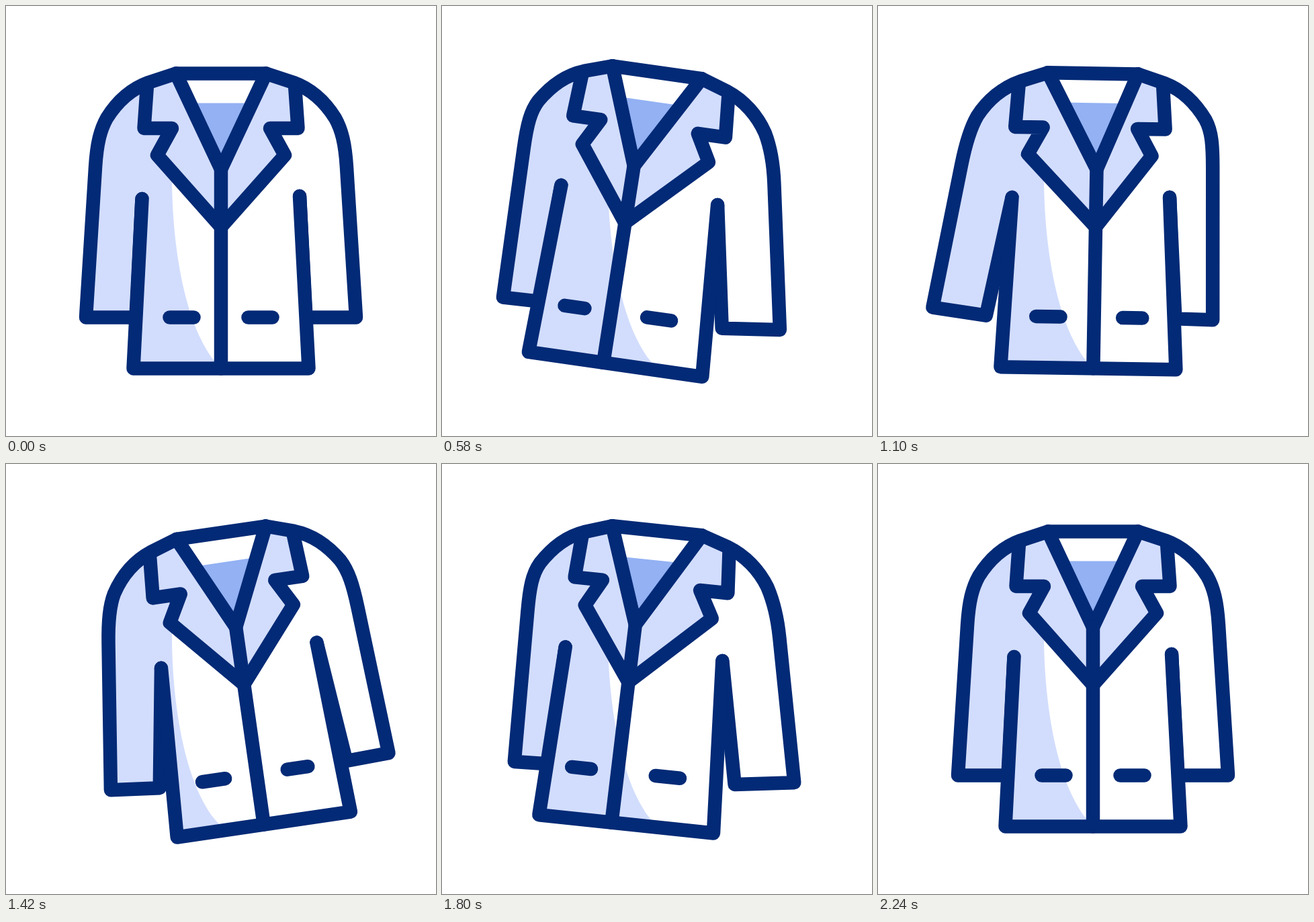
An HTML page with a canvas for the animation above (2420 ms loop, 640x640 px).

```html
<!DOCTYPE html>
<html lang="en">
<head>
<meta charset="utf-8">
<title>Swinging jacket</title>
<style>
  html, body { margin: 0; width: 100%; height: 100%; overflow: hidden; background: #fff; }
  canvas { display: block; width: 640px; height: 640px; }
</style>
</head>
<body>
<canvas id="stage" width="640" height="640"></canvas>
<script>
const ctx = document.getElementById('stage').getContext('2d');
const NAVY = '#032a76', PALE = '#d2ddfd', BLUE = '#93b1f3';
const LOOP = 2420, STEP = 20;
const PIVOT = [332, 100];

// [time, value] keys, eased in and out between neighbours
const TILT = [[200, 0], [813, 12], [1365, -8.9], [1840, 6.3], [2240, 0]];
const LEFT = [[200, 0], [720, 1], [1180, 0], [1820, 1], [2100, 0]];
const RIGHT = [[720, 0], [1180, 1], [1820, 0]];

function valueAt(keys, t) {
  if (t <= keys[0][0]) return keys[0][1];
  for (let i = 1; i < keys.length; i++) {
    const [t0, a] = keys[i - 1], [t1, b] = keys[i];
    if (t < t1) {
      const p = (t - t0) / (t1 - t0);
      return a + (b - a) * p * p * (3 - 2 * p);
    }
  }
  return keys[keys.length - 1][1];
}

function line(points, closed) {
  const path = new Path2D();
  points.forEach(([x, y]) => path.lineTo(x, y));
  if (closed) path.closePath();
  return path;
}

// Shoulder curve, cuff and inner seam; side is 1 for left, -1 for right
function sleeve(side, bend, cuff, inner, arm) {
  const x = v => side > 0 ? v : 640 - v;
  const elbow = x(133) + bend, lift = bend * .2;
  const path = new Path2D();
  path.moveTo(x(253), 100.5);
  path.lineTo(x(212), 114);
  path.bezierCurveTo(x(186), 123.5, x(165) + lift, 143, x(150) + lift, 167);
  // The curve runs straight on into the lower sleeve
  path.bezierCurveTo(x(140.5) + lift, 184,
    elbow + (elbow - cuff[0]) * .16, 240 + (240 - cuff[1]) * .16, elbow, 240);
  path.lineTo(...cuff);
  path.lineTo(...inner);
  path.lineTo(...arm);
  return path;
}

// Light boundary stays still while the jacket swings
const shade = new Path2D('M0 0H247V255C247 350 264 470 310 528L340 562V640H0Z');

function draw(t) {
  const l = valueAt(LEFT, t), r = valueAt(RIGHT, t);
  const mix = (rest, dl, dr) => rest + l * dl + r * dr;

  const armL = [202.5, 287], armR = [437, 283];
  const hemL = [189.5, 539.5], hemR = [450.5, 539.5];
  const sleeveL = sleeve(1, mix(0, 8, -8),
    [mix(119, 26, -37), mix(463.5, 1, -12)],
    [mix(194, 3, -30), mix(463.5, -1, 0)], armL);
  const sleeveR = sleeve(-1, mix(0, 11, -8),
    [mix(521, 41.5, -22), mix(463.5, -11.5, 2)],
    [mix(446, 28.5, 0), mix(463.5, .5, 0)], armR);

  const neck = [mix(320, -17.5, 10), 243];
  const fold = [mix(320, -19, 10), 329];
  const hem = [mix(320, -22, 10), 539.5];
  const tuck = mix(0, 0, -6);
  const collarL = [253, 100.5], collarR = [387, 100.5];
  const lapelL = [[210, 118], [205.5, 182], [247, 182], [225, 222], fold];
  const lapelR = [[430 + tuck, 118], [434.5 + tuck, 182], [393 + tuck, 182], [415 + tuck, 222], fold];
  const pocket = (mid, len) => line([[mid - len / 2, 463.5], [mid + len / 2, 463.5]]);

  ctx.setTransform(1, 0, 0, 1, 0, 0);
  ctx.globalCompositeOperation = 'source-over';
  ctx.clearRect(0, 0, 640, 640);
  ctx.translate(...PIVOT);
  ctx.rotate(valueAt(TILT, t) * Math.PI / 180);
  ctx.translate(-PIVOT[0], -PIVOT[1]);
  ctx.lineWidth = 20.5;
  ctx.lineCap = ctx.lineJoin = 'round';
  ctx.strokeStyle = NAVY;

  ctx.stroke(sleeveL);
  ctx.stroke(sleeveR);

  // The body hides whatever part of a sleeve lies behind it
  ctx.globalCompositeOperation = 'destination-out';
  ctx.fill(line([armL, hemL, hemR, armR], true));

  ctx.globalCompositeOperation = 'source-over';
  [
    line([armL, hemL, hemR, armR]),
    line([collarL, collarR]),
    line([collarL, neck, collarR]),
    line([neck, hem]),
    line(lapelL),
    line(lapelR),
    pocket(mix(261.5, -16.5, -1), mix(36, -7, 1)),
    pocket(mix(378.5, -4.5, 7), mix(36, .5, -7.5))
  ].forEach(path => ctx.stroke(path));

  // Colours go underneath the lines
  ctx.globalCompositeOperation = 'destination-over';
  ctx.fillStyle = PALE;
  ctx.fill(line([collarL, ...lapelL, neck], true));
  ctx.fill(line([collarR, ...lapelR, neck], true));
  ctx.fillStyle = BLUE;
  ctx.fill(line([[274, 144.5], [366, 144.5], neck], true));

  ctx.fillStyle = PALE;
  const body = line([armL, hemL, hemR, armR, collarR, collarL, [200, 140]], true);
  for (const part of [sleeveL, body]) {
    ctx.save();
    ctx.clip(part);
    ctx.setTransform(1, 0, 0, 1, 0, 0);
    ctx.fill(shade);
    ctx.restore();
  }
}

const start = performance.now();
function tick() {
  const t = (performance.now() - start) % LOOP;
  draw(Math.floor(t / STEP) * STEP);
  requestAnimationFrame(tick);
}
tick();
</script>
</body>
</html>
```
